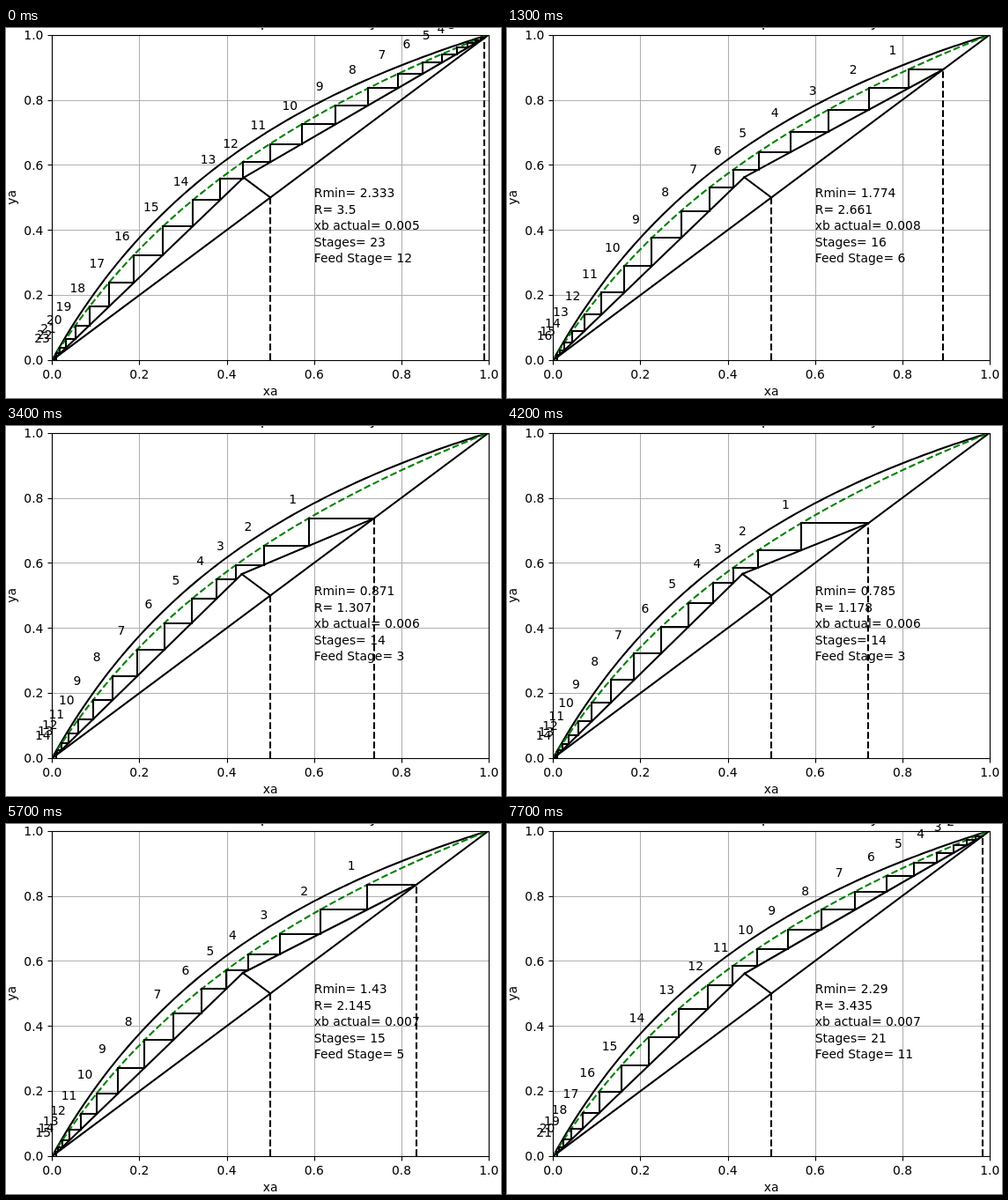
An HTML page with a canvas for the animation above (7.8 s loop, 562 by 420 pixels).

```html
<!DOCTYPE html>
<html lang="en">
<head>
<meta charset="utf-8">
<title>Stage diagram</title>
<style>
  html, body { margin: 0; width: 100%; height: 100%; overflow: hidden; background: #fff; }
  canvas { display: block; }
</style>
</head>
<body>
<canvas id="stage" width="562" height="420"></canvas>
<script>
const ctx = document.getElementById('stage').getContext('2d');

// Plot area
const LEFT = 52.2, BOTTOM = 377.2, W = 496, H = 369.6;
const px = x => LEFT + x * W;
const py = y => BOTTOM - y * H;

// Binary column: volatility, tray efficiency, feed and bottoms
const ALPHA = 179.2 / 74.3, EFF = 0.8, XF = 0.5, XB = 0.01, R_FACTOR = 1.5;
const B = ALPHA - 1, K = 1 - EFF;
const XD_MAX = 0.99, XD_MIN = 0.7, HALF = 39, STEP_MS = 100;

const ideal = x => ALPHA * x / (1 + B * x);
const actual = x => K * x + EFF * ideal(x);
const root = (a, b, c) => (-b + Math.sqrt(b * b - 4 * a * c)) / (2 * a);
const liquid = y => root(K * B, K + EFF * ALPHA - y * B, -y);
const round3 = v => String(+v.toFixed(3));

// The feed line is y = 1 - x
const pinchX = root((1 + K) * B, K + EFF * ALPHA - B + 1, -1);
const pinchY = 1 - pinchX;

function solve(xd) {
  const rMin = (xd - pinchY) / (pinchY - pinchX);
  const r = R_FACTOR * rMin;
  const qx = (r + 1 - xd) / (2 * r + 1), qy = 1 - qx;
  const slope = (qy - XB) / (qx - XB);
  const steps = [];
  let x = xd, y = xd, feed = 0;
  while (x > XB && steps.length < 60) {
    const x2 = liquid(y);
    if (!feed && x2 < qx) feed = steps.length + 1;
    const y2 = feed ? XB + slope * (x2 - XB) : (r * x2 + xd) / (r + 1);
    steps.push({ x, y, x2, y2 });
    x = x2;
    y = y2;
  }
  return { rMin, r, qx, qy, steps, feed, xb: x };
}

function stroke(points, color = '#000', dash = []) {
  ctx.strokeStyle = color;
  ctx.lineWidth = 2.08;
  ctx.setLineDash(dash);
  ctx.lineCap = dash.length ? 'butt' : 'square';
  ctx.lineJoin = 'round';
  ctx.beginPath();
  for (const [x, y] of points) ctx.lineTo(x, y);
  ctx.stroke();
}

const line = (...pts) => stroke(pts.map(([x, y]) => [px(x), py(y)]));

// Horizontal and vertical lines sit on whole pixels
const crisp = (pts, dash) =>
  stroke(pts.map(([x, y]) => [Math.round(px(x)), Math.round(py(y))]), '#000', dash);

const DASH = [7.71, 3.33];
const dropLine = x => crisp([[x, 0], [x, x]], DASH);

function curve(fn, color, dash) {
  const pts = [];
  for (let i = 0; i < 100; i++) {
    const x = i / 99;
    pts.push([px(x), py(fn(x))]);
  }
  stroke(pts, color, dash);
}

function thin(x1, y1, x2, y2, color) {
  ctx.strokeStyle = color;
  ctx.lineWidth = 1.11;
  ctx.lineCap = 'butt';
  ctx.setLineDash([]);
  ctx.beginPath();
  ctx.moveTo(x1, y1);
  ctx.lineTo(x2, y2);
  ctx.stroke();
}

function text(s, x, y, align = 'left', size = 13.89) {
  ctx.font = size + 'px "DejaVu Sans", sans-serif';
  ctx.textAlign = align;
  ctx.fillStyle = '#000';
  ctx.fillText(s, x, y);
}

const edge = v => Math.round(v) + 0.5;
const x0 = edge(px(0)), x1 = edge(px(1)), y0 = edge(py(0)), y1 = edge(py(1));

function grid() {
  for (let i = 0; i <= 5; i++) {
    const gx = edge(px(i / 5)), gy = edge(py(i / 5));
    thin(gx, y0, gx, y1, '#b0b0b0');
    thin(x0, gy, x1, gy, '#b0b0b0');
  }
}

function axes() {
  for (let i = 0; i <= 5; i++) {
    const v = i / 5, gx = edge(px(v)), gy = edge(py(v));
    thin(gx, y0, gx, y0 + 5, '#000');
    thin(x0 - 5, gy, x0, gy, '#000');
    text(v.toFixed(1), px(v), 398, 'center');
    text(v.toFixed(1), 42.4, py(v) + 5.2, 'right');
  }
  ctx.strokeStyle = '#000';
  ctx.lineWidth = 1.11;
  ctx.strokeRect(x0, y0, x1 - x0, y1 - y0);
  text('xa', px(0.5), 417, 'center');
  ctx.save();
  ctx.translate(11, py(0.5));
  ctx.rotate(-Math.PI / 2);
  text('ya', 0, 0, 'center');
  ctx.restore();
  text('Distilled Composition Activity', px(0.5), -1, 'center', 16.67);
}

function draw(xd) {
  const s = solve(xd);
  ctx.fillStyle = '#fff';
  ctx.fillRect(0, 0, 562, 420);
  grid();

  ctx.save();
  ctx.beginPath();
  ctx.rect(x0 - 0.5, y1 - 0.5, x1 - x0 + 1, y0 - y1 + 1);
  ctx.clip();
  curve(ideal, '#000');
  curve(actual, '#008000', DASH);
  line([0, 0], [1, 1]);
  line([xd, xd], [s.qx, s.qy]);
  line([XB, XB], [s.qx, s.qy]);
  line([XF, XF], [s.qx, s.qy]);
  [xd, XF, XB].forEach(dropLine);
  for (const p of s.steps) {
    crisp([[p.x, p.y], [p.x2, p.y]]);
    crisp([[p.x2, p.y], [p.x2, p.y2]]);
  }
  ctx.restore();

  axes();
  s.steps.forEach((p, i) => text(i + 1, px(p.x2 - 0.045), py(p.y + 0.045)));
  [
    'Rmin= ' + round3(s.rMin),
    'R= ' + round3(s.r),
    'xb actual= ' + round3(s.xb),
    'Stages= ' + s.steps.length,
    'Feed Stage= ' + s.feed
  ].forEach((t, i) => text(t, px(0.6), py(0.5 - 0.05 * i)));
}

const start = performance.now();
let shown = -1;

function tick() {
  const n = Math.floor((performance.now() - start) / STEP_MS) % (2 * HALF);
  if (n !== shown) {
    shown = n;
    const k = Math.min(n, 2 * HALF - n);
    draw(XD_MAX - (XD_MAX - XD_MIN) * k / HALF);
  }
  requestAnimationFrame(tick);
}
tick();
</script>
</body>
</html>
```
